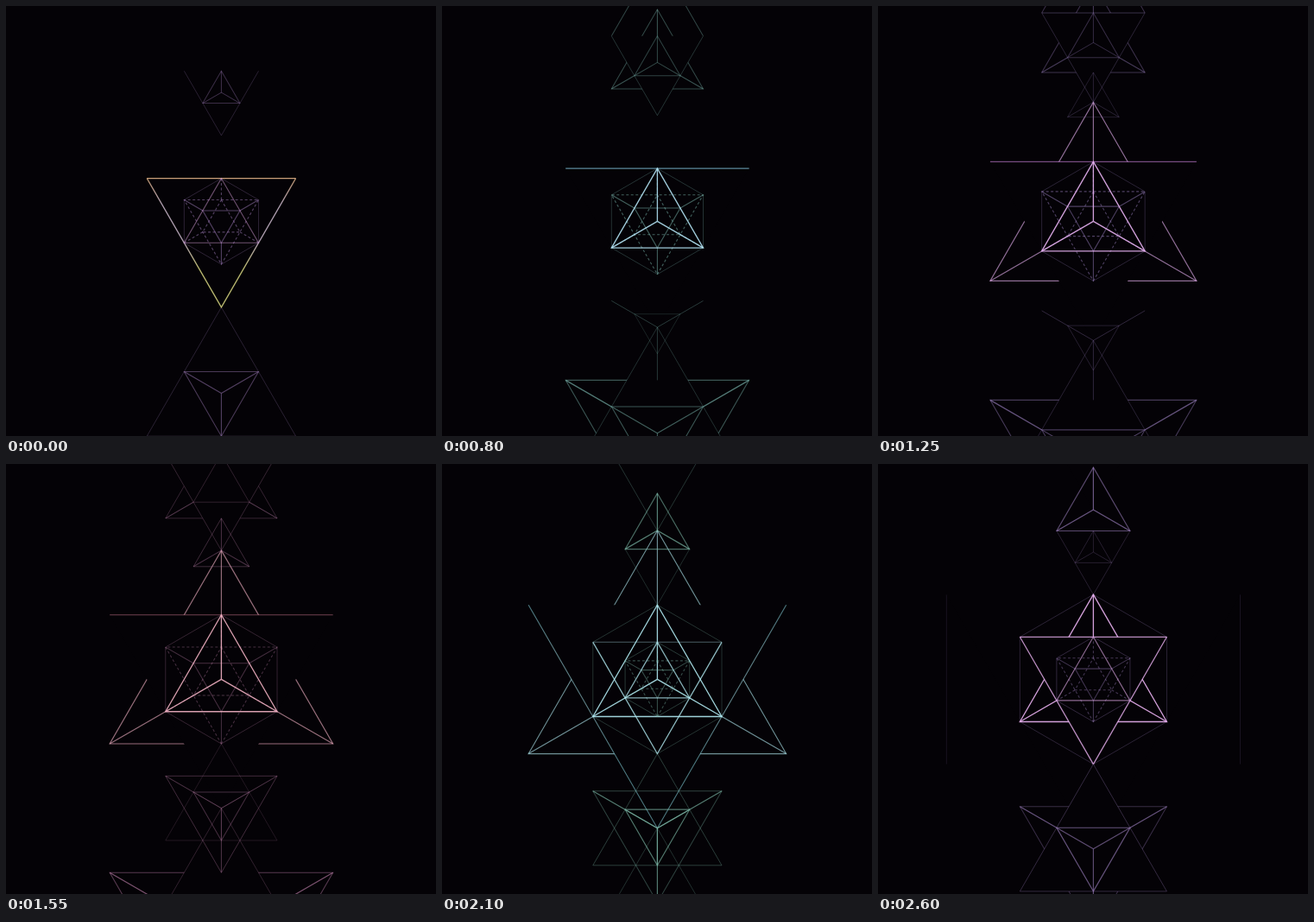
An HTML page with a canvas that plays this animation: 498 by 498 pixels, repeating every 2.65 s.

```html
<!DOCTYPE html>
<html lang="en">
<head>
<meta charset="utf-8">
<title>Triangle tunnel</title>
<style>
  html, body { margin: 0; width: 100%; height: 100%; overflow: hidden; background: #040206; }
  canvas { display: block; width: 498px; height: 498px; }
</style>
</head>
<body>
<canvas id="stage" width="498" height="498"></canvas>
<script>
const ctx = document.getElementById('stage').getContext('2d');
const LOOP = 2650, STEP = 50, MID = 249.4, H = Math.sqrt(3) / 2;
const BACK = '#040206', START = -1;

let p = 0;       // progress through the loop, 0 to 1
let s = 50;      // pixels per unit, doubles in one loop
let lit, dim;    // colours of strong and weak lines

const ramp = at => {
  const x = Math.min(1, Math.max(0, (p - at) / 0.1 + 0.5));
  return x * x * (3 - 2 * x);
};
// Strength of a line that lights up around `on` and goes out around `off`
const glow = (peak, on, off = 2) => peak * ramp(on) * (1 - ramp(off));
const hsl = (h, sat, light) => `hsl(${h % 360}, ${sat}%, ${light}%)`;
const px = x => MID + x * s;

function trace(points, closed) {
  ctx.beginPath();
  points.forEach(([x, y]) => ctx.lineTo(px(x), px(y)));
  if (closed) ctx.closePath();
}

function stroke(points, a, color, closed = false) {
  if (a < 0.01) return;
  trace(points, closed);
  ctx.globalAlpha = Math.min(1, a);
  ctx.lineWidth = 0.8 + 0.6 * a;
  ctx.strokeStyle = color;
  ctx.stroke();
}

// dir 1 points up, -1 points down; the first corner is the tip
const corners = (y, r, dir) => [
  [0, y - r * dir], [H * r, y + r * dir / 2], [-H * r, y + r * dir / 2]
];

const tri = (y, r, dir, a, color) => stroke(corners(y, r, dir), a, color, true);
const base = (y, r, dir, a, color) => stroke(corners(y, r, dir).slice(1), a, color);

function sides(y, r, dir, a, color) {
  const [tip, right, left] = corners(y, r, dir);
  stroke([right, tip, left], a, color);
}

function spokes(y, r, dir, a, color, from = 0) {
  for (const [cx, cy] of corners(y, r, dir))
    stroke([[cx * from, y + (cy - y) * from], [cx, cy]], a, color);
}

// Triangle with lines from its centre to the corners
function tetra(y, r, dir, a, b, color) {
  tri(y, r, dir, a, color);
  spokes(y, r, dir, b, color);
}

function cover(y, r, dir, a = 1) {
  if (a < 0.01) return;
  trace(corners(y, r, dir), true);
  ctx.globalAlpha = a;
  ctx.fillStyle = BACK;
  ctx.fill();
}

function hexagon(r, a, color) {
  const pts = [...Array(6).keys()].map(i => [
    r * Math.sin(i * Math.PI / 3), -r * Math.cos(i * Math.PI / 3)
  ]);
  stroke(pts, a, color, true);
}

function icosa(r, a, color) {
  tri(0, r / 2, -1, a, color);
  spokes(0, r, -1, a, color, 0.5);
  ctx.setLineDash([3, 2.5]);
  tri(0, r, -1, a, color);
  tri(0, r / 2, 1, a, color);
  spokes(0, r, 1, a, color, 0.5);
  ctx.setLineDash([]);
}

function lowerFar() {
  tetra(4, 2, -1, glow(0.45, 0.1, 0.75), glow(0.65, 0.1, 0.75), dim);
  cover(4, 2, 1);
  tri(4, 2, 1, glow(0.26, START, 0.9), dim);
  tetra(4, 1, -1, glow(0.45, START, 0.75), glow(0.5, START, 0.75), dim);
}

function upperFar() {
  sides(-4, 1, 1, glow(0.36, 0.24, 0.6), dim);
  tetra(-3, 1, 1, glow(0.38, 0.1, 0.6), glow(0.45, 0.1, 0.75), dim);
  cover(-3, 1, -1);
  sides(-3, 1, -1, glow(0.25, START, 0.1) + glow(0.28, 0.24, 0.9), dim);
  base(-3, 1, -1, glow(0.36, 0.4, 0.6), dim);
  tetra(-3, 0.5, 1, glow(0.35, START, 0.6), glow(0.38, START, 0.5), dim);
}

// Large falling triangle: opens in gold, then takes the common colour
function falling(hue) {
  const warm = 1 - ramp(0.08);
  const rim = hsl(hue + 90 * warm, 60, 70);
  const fall = ctx.createLinearGradient(0, px(-1), 0, px(2));
  fall.addColorStop(0, rim);
  fall.addColorStop(0.2, hsl(hue, 70 - 50 * warm, 80));
  fall.addColorStop(0.5, hsl(hue, 70 - 50 * warm, 80));
  fall.addColorStop(0.7, hsl(hue + 120 * warm, 65, 72));
  sides(0, 2, -1, glow(0.8, START, 0.24) + glow(0.55, 0.65, 0.9), fall);
  base(0, 2, -1, glow(0.9 - 0.7 * p, START, 0.75), rim);
}

function centre(hue) {
  for (const x of [-2 * H, 2 * H]) stroke([[x, -1], [x, 1]], glow(0.16, 0.9), dim);

  const wide = glow(0.62, 0.4, 0.9);
  tetra(0, 2, 1, wide, wide, lit);
  cover(0, 2, -1);
  falling(hue);

  hexagon(1, 0.27, dim);
  icosa(1, glow(0.5, START, 0.6), dim);
  tetra(0, 1, 1, 0.45 + glow(0.45, 0.1), glow(0.9, 0.1), lit);

  cover(0, 1, -1, glow(1, 0.9));
  sides(0, 1, -1, glow(0.8, 0.68), lit);
  base(0, 1, -1, glow(0.4, 0.65) + glow(0.4, 0.9), lit);
  hexagon(0.5, glow(0.3, 0.7), dim);
  icosa(0.5, glow(0.42, 0.7), dim);
  tri(0, 0.5, 1, glow(0.75, 0.62, 0.9) + glow(0.6, 0.9), lit);
}

function lowerNear() {
  tetra(2, 1, -1, glow(0.35, 0.55), glow(0.3, 0.12) + glow(0.35, 0.6), dim);
  cover(2, 1, 1, glow(1, 0.9));
  tri(2, 1, 1, glow(0.32, 0.58), dim);
  tetra(2, 0.5, -1, glow(0.24, 0.28) + glow(0.4, 0.6), glow(0.6, 0.6), dim);
}

function upperNear() {
  const a = glow(0.22, 0.4) + glow(0.35, 0.6);
  tetra(-2, 0.5, 1, a, 1.2 * a, dim);
  sides(-1.5, 0.5, -1, glow(0.24, 0.65), dim);
  const small = glow(0.24, 0.85);
  tetra(-1.5, 0.25, 1, small, small, dim);
}

function draw(t) {
  p = t / LOOP;
  s = 49.75 * 2 ** p;

  // Two turns of the colour wheel per loop, quicker through green
  const hue = 312 + 720 * p + 30 * Math.cos(4 * Math.PI * (p - 0.34));
  lit = hsl(hue, 70, 82);
  dim = hsl(hue - 25, 32, 62);

  ctx.globalAlpha = 1;
  ctx.fillStyle = BACK;
  ctx.fillRect(0, 0, 498, 498);

  lowerFar();
  upperFar();
  centre(hue);
  lowerNear();
  upperNear();
}

const start = performance.now();
function tick() {
  const t = (performance.now() - start) % LOOP;
  draw(Math.floor(t / STEP) * STEP);
  requestAnimationFrame(tick);
}
tick();
</script>
</body>
</html>
```
